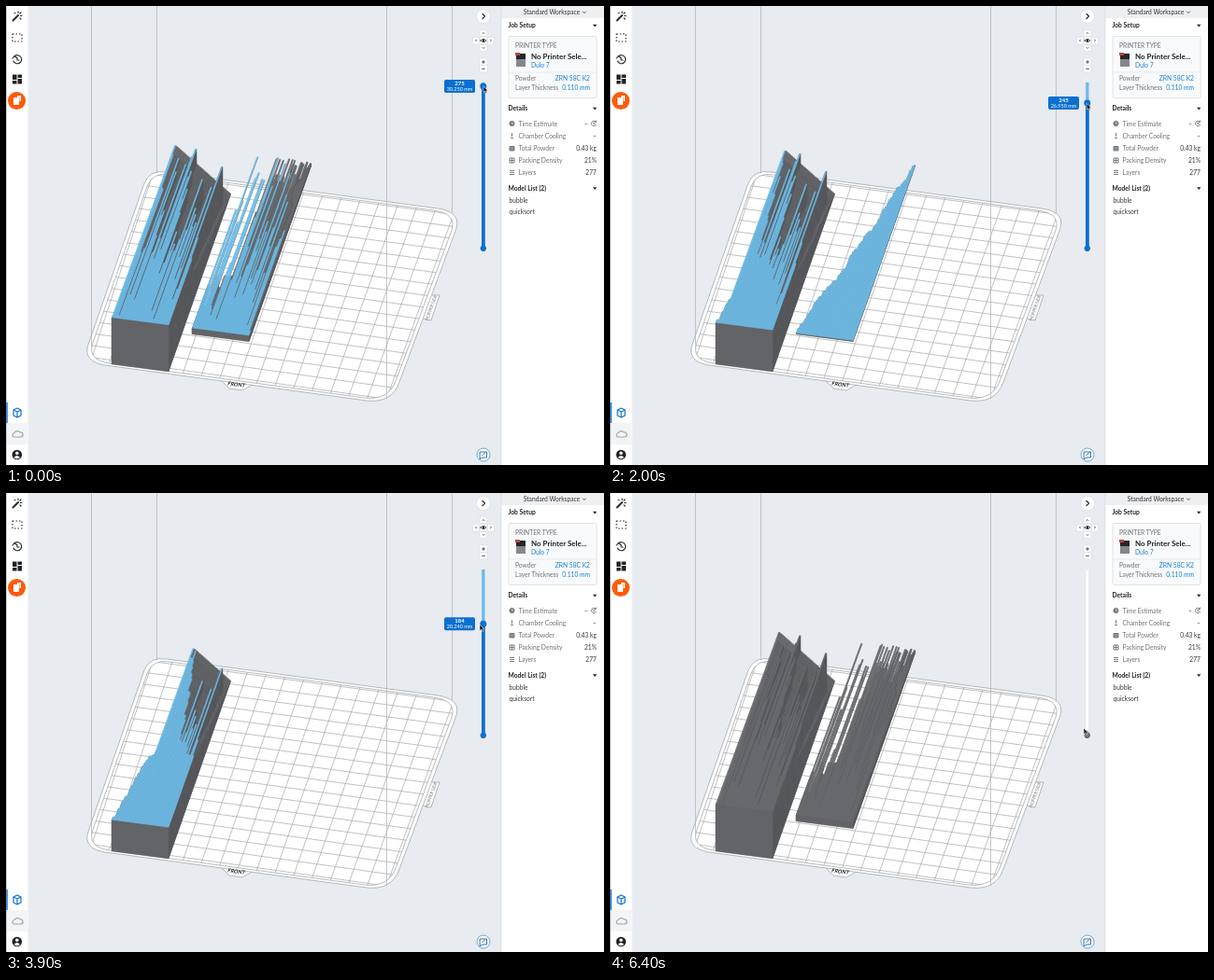
Recreate the animation shown at these times as an HTML page with a canvas. Size 640 by 492 pixels, loop 7.14 s.

```html
<!DOCTYPE html>
<html lang="en">
<head>
<meta charset="utf-8">
<title>Layer preview</title>
<style>
  html, body { margin: 0; width: 100%; height: 100%; overflow: hidden; background: #e8ebef; }
  svg, canvas { position: absolute; left: 0; top: 0; width: 640px; height: 492px; }
  text { font-family: Lato, "Open Sans", sans-serif; font-size: 6.7px; fill: #33373b; }
  .bold { font-weight: 700; fill: #202428; }
  .soft { fill: #6d7278; }
  .link { fill: #1581d0; }
  .end { text-anchor: end; }
  .mid { text-anchor: middle; }
  .icon { fill: none; stroke: #2b2e31; stroke-width: 1.2; stroke-linecap: round; stroke-linejoin: round; }
  .button { fill: #fff; stroke: #cfd4d9; stroke-width: .5; }
</style>
</head>
<body>
<svg viewBox="0 0 640 492">
  <defs>
    <path id="plate" d="M148 190Q154 175 172 178L462 217Q489 221 481 241L421 403Q413 426 386 423L106 385Q82 381 88 363Z"/>
    <clipPath id="bed"><use href="#plate" transform="translate(285 300) scale(.976) translate(-285 -300)"/></clipPath>
  </defs>
  <rect width="640" height="492" fill="#e8ebef"/>
  <g fill="#fff" stroke="#a4a7aa" stroke-width=".8">
    <path d="M229 400L239 410L253 412L265 405M455 310L464 310L455 337L446 335"/>
    <use href="#plate"/>
    <use href="#plate" transform="translate(285 300) scale(.976) translate(-285 -300)"/>
    <path id="grid" clip-path="url(#bed)" fill="none" stroke="#a5a7aa" stroke-width=".7"/>
    <path d="M91.5 0V366M161.5 0V179M407.5 0V421M477.500 0V222" fill="none" stroke="#aeb2b6" stroke-width=".7"/>
  </g>
  <text class="mid bold" style="font-size:5.5px" transform="translate(246 407.500) rotate(7) skewX(-12)">FRONT</text>
  <text class="mid soft" style="font-size:4.500px" transform="translate(456.500 324) rotate(-70)">HOPPER SIDE</text>
</svg>
<canvas id="models" width="640" height="492"></canvas>
<svg viewBox="0 0 640 492">
  <!-- tool strip -->
  <path d="M0 0H23.500V492H0Z" fill="#fff"/>
  <path d="M.5 0V492" stroke="#b9bdc1" stroke-width=".8"/>
  <path d="M1 447H23V470H1Z" fill="#f3f4f5"/>
  <path d="M1 425V447" stroke="#0d72cf" stroke-width="1.5"/>
  <g class="icon">
    <path d="M7.500 15.500L13 10" stroke-width="2"/>
    <path d="M13 6V7.500M17 10.500H15.500M16 7L15 8M9 7.500H10M16 14L15 13"/>
    <rect x="7" y="30" width="10" height="8" stroke-dasharray="1.5 2" stroke-linecap="butt"/>
    <path d="M9 54A4.500 4.500 0 1 1 8 59M7 56L9 53.500L11.500 55.500M12 55.500V58H14"/>
  </g>
  <path d="M7 73.500H11.500V79H7ZM12.500 73.500H17V77H12.500ZM7 80H11.500V83.500H7ZM12.500 78H17V83.500H12.500Z" fill="#222527"/>
  <circle cx="11.500" cy="101.500" r="9.500" fill="#ff5a0a"/>
  <path d="M8 98H14V106H8ZM12 96H16V102H14.500V98H12Z" fill="#fff"/>
  <g class="icon" stroke-width="1">
    <path d="M8 433L12 431L16 433V439L12 441L8 439ZM8 433L12 435L16 433M12 435V441" stroke="#0d72cf" style="stroke:#0d72cf"/>
    <path d="M8 462A2.500 2.500 0 0 1 9 457.500A3.500 3.500 0 0 1 15 457A2.500 2.500 0 0 1 16 462Z" style="stroke:#a2a6aa"/>
  </g>
  <circle cx="11.800" cy="481" r="5.300" fill="#202326"/>
  <circle cx="11.800" cy="479.300" r="1.800" fill="#fff"/>
  <path d="M8.500 484Q11.800 480 15 484Q11.800 486.500 8.500 484Z" fill="#fff"/>

  <!-- view controls -->
  <circle class="button" cx="511" cy="11" r="7.500"/>
  <path class="icon" d="M510 8.500L512.500 11L510 13.500"/>
  <g class="button">
    <rect x="507" y="25.500" width="8" height="7" rx="1.5"/><rect x="507" y="41.500" width="8" height="7" rx="1.5"/>
    <rect x="499.500" y="33.500" width="7" height="7.500" rx="1.5"/><rect x="515.500" y="33.500" width="7" height="7.500" rx="1.5"/>
    <rect x="507" y="33" width="8" height="8" rx="1.5"/>
    <rect x="507" y="56" width="8" height="7.500" rx="1"/><rect x="507" y="63.500" width="8" height="7.500" rx="1"/>
  </g>
  <g class="icon" style="stroke-width:.8">
    <path d="M510 29.500L511 28.500L512 29.500M510 44.500L511 45.500L512 44.500M503.500 36L502.500 37L503.500 38M518.500 36L519.500 37L518.500 38M509.500 60H512.500M511 58.500V61.500M509.500 67.300H512.500"/>
    <path d="M508 37Q511 33.500 514 37Q511 40.500 508 37Z"/>
  </g>
  <circle cx="511" cy="37" r="1.300" fill="#222"/>
  <circle cx="511" cy="481" r="7" fill="#fff" stroke="#4a94ce" stroke-width=".8"/>
  <path d="M507.500 478H514.500V484H510L507.500 485.500ZM509.500 482L513 478.500" class="icon" style="stroke:#23639a;stroke-width:.9"/>

  <!-- side panel -->
  <rect x="530" width="110" height="492" fill="#fff"/>
  <rect x="530" width="110" height="13" fill="#eeeff0"/>
  <path d="M530 0V492" stroke="#d5d9dd" stroke-width=".7"/>
  <text class="mid" x="584" y="9">Standard Workspace</text>
  <path class="icon" d="M617.500 6L619 7.500L620.500 6" style="stroke-width:.8"/>
  <rect x="538" y="32.500" width="94" height="66" rx="1.5" fill="#f9fafb" stroke="#d9dde1" stroke-width=".8"/>
  <text class="soft" x="545" y="45">PRINTER TYPE</text>
  <path d="M546 52H556V65H546Z" fill="#85888b"/><path d="M546 51H556V57H546Z" fill="#242629"/><path d="M545 50H550V53H545Z" fill="#b9483e"/>
  <text class="bold" x="562" y="57" style="font-size:8px">No Printer Sele...</text>
  <text class="link" x="562" y="65.500">Dulo 7</text>
  <path d="M538 71H632" stroke="#e0e3e6" stroke-width=".7"/>
  <g id="panel"></g>
  <g fill="none" stroke="#777c81" stroke-width="1">
    <circle cx="541.500" cy="126" r="2.600" fill="#777c81"/><path d="M541.500 124.500V126H543" stroke="#fff" stroke-width=".6"/>
    <path d="M541.500 136V140M540 141.500H543"/><path d="M539 150.500H544V155H539Z" fill="#8b8f93"/>
    <path d="M539 163H544V168H539ZM541.500 163V168M539 165.500H544"/><path d="M539 176.500H544M539 178.500H544M539 180.500H544"/>
    <path d="M631 124A2.700 2.700 0 1 0 631.700 127M629 124.500V126.500H630.500M631.500 122.500V124.500H629.700" stroke="#4d5155" stroke-width=".7"/>
  </g>

  <!-- layer slider -->
  <rect x="509" y="82" width="3.500" height="178" rx="1.5" fill="#fff" stroke="#d4d8dc" stroke-width=".4"/>
  <g id="slider">
    <rect x="509.200" y="82" width="3.300" height="178" fill="#6cb9ea"/>
    <rect id="range" x="509" width="3.700" fill="#0b70cf"/>
    <circle id="knob" cx="510.800" r="3.500" fill="#0b70cf"/>
    <rect id="tag" height="14" rx="1.800" fill="#0b70cf"/>
    <text id="layer" class="mid" style="fill:#fff;font-weight:700;font-size:6px"></text>
    <text id="height" class="mid" style="fill:#fff;font-size:5.500px"></text>
  </g>
  <path id="foot" d="M510.800 254.500L513.500 258A3.200 3.200 0 1 1 508.100 258Z"/>
  <path id="cursor" d="M0 0V6.500L1.600 5.200L2.700 7.600L3.800 7.100L2.800 4.800H4.800Z" fill="#111" stroke="#fff" stroke-width=".5"/>
</svg>
<script>
const $ = id => document.getElementById(id);
const mix = (a, b, f) => a + (b - a) * f;
const LOOP = 7140, TICK = 100, LAST = 64, TOP = 277, BARS = 50;
const BLUE = '#6cbae5', FRONT = '#626467', SIDE = '#505255', LID = '#686a6d';

// [time, layer] and [time, cursor x, cursor y]
const layerKeys = [[0, 275], [1300, 259], [2700, 231], [3200, 220], [3900, 184], [4000, 179], [4800, 116], [4900, 106], [5700, 35], [6300, 2]];
const cursorKeys = [[0, 511, 86], [1300, 511, 96], [2700, 509.5, 113], [3900, 507, 141], [4900, 503.5, 188], [5700, 505, 230], [6400, 507, 252]];

function sample(keys, time, column) {
  const next = keys.findIndex(key => key[0] > time);
  if (next < 0) return keys[keys.length - 1][column];
  const a = keys[next - 1], b = keys[next];
  return mix(a[column], b[column], (time - a[0]) / (b[0] - a[0]));
}

function randomBars(seed, fixed) {
  const bars = Array.from({ length: BARS }, () => {
    seed = (seed * 16807) % 2147483647;
    return 0.02 + 0.94 * seed / 2147483647;
  });
  return Object.assign(bars, fixed);
}

// One snapshot per outer pass of an exchange sort.
function exchangeSort(bars) {
  const states = [bars.slice()];
  for (let i = 0; i < BARS - 1; i++) {
    for (let j = i + 1; j < BARS; j++)
      if (bars[j] < bars[i]) [bars[i], bars[j]] = [bars[j], bars[i]];
    states.push(bars.slice());
  }
  return states;
}

// One snapshot per partition level.
function quickSort(bars) {
  const states = [bars];
  let groups = [bars];
  while (groups.some(group => group.length > 1)) {
    groups = groups.flatMap(group => {
      if (group.length < 2) return [group];
      const pivot = group[group.length >> 1];
      return [group.filter(v => v < pivot), [pivot], group.filter(v => v > pivot)].filter(g => g.length);
    });
    states.push(groups.flat());
  }
  return states;
}

const models = [
  { x: 113, base: 0, states: exchangeSort(randomBars(7321, { 0: 1, 19: 0.99, 44: 0.785, 49: 0.38 })) },
  { x: 199, base: 240, states: quickSort(randomBars(90417, { 2: 0.995, 20: 1, 28: 0.97 })) }
];

const ctx = $('models').getContext('2d');

function project(model, u, depth, z) {
  const lift = z / TOP, x = model.x + 61 * u;
  return [x + depth * (67.5 - u), 384 + (x - 113) * 0.13 - 50 * lift - depth * (185 + 3 * u + 2 * (1 - lift))];
}

function quad(color, ...points) {
  ctx.fillStyle = ctx.strokeStyle = color;
  ctx.beginPath();
  points.forEach(p => ctx.lineTo(...p));
  ctx.closePath();
  ctx.fill();
  ctx.stroke();
}

function drawModel(model, cut, sliced) {
  if (cut <= model.base) return;
  const { states, base } = model, thick = (TOP - base) / states.length;
  const at = (u, depth, z) => project(model, u, depth, z);
  for (let s = states.length - 1; s >= 0; s--) {
    const low = TOP - (s + 1) * thick, full = low + thick;
    if (low >= cut) break;
    const high = Math.min(full, cut);
    const lid = sliced && full >= cut ? BLUE : LID;
    states[s].forEach((len, i) => {
      const a = i / BARS, b = (i + 1) / BARS, near = states[s][i + 1] || 0;
      if (near < len) quad(SIDE, at(b, near, low), at(b, len, low), at(b, len, high), at(b, near, high));
      quad(lid, at(a, 0, high), at(b, 0, high), at(b, len, high), at(a, len, high));
    });
  }
  quad(FRONT, at(0, 0, base), at(1, 0, base), at(1, 0, cut), at(0, 0, cut));
}

function drawSlider(layer) {
  const y = 86 + (275 - layer) * 0.597, mm = (layer * 0.11).toFixed(3) + ' mm';
  const width = 33 - (9 - mm.length) * 4;
  const set = (id, values) => Object.entries(values).forEach(([k, v]) => $(id).setAttribute(k, v));
  set('range', { y, height: 260 - y });
  set('knob', { cy: y });
  set('tag', { x: 502 - width, y: y - 7, width });
  set('layer', { x: 502 - width / 2, y: y - 1.2 });
  set('height', { x: 502 - width / 2, y: y + 4.8 });
  $('layer').textContent = layer;
  $('height').textContent = mm;
}

function buildGrid() {
  const point = (u, v) => [mix(mix(153, 485, u), mix(86, 411, u), v), mix(mix(177, 221, u), mix(379, 425, u), v)];
  let d = '';
  for (let i = -8; i <= 8; i++) {
    const f = 0.5 + i / 16.5;
    d += `M${point(f, 0)}L${point(f, 1)}M${point(0, f)}L${point(1, f)}`;
  }
  $('grid').setAttribute('d', d);
}

function buildPanel() {
  const text = (x, y, cls, label) => `<text x="${x}" y="${y}" class="${cls}">${label}</text>`;
  let out = '';
  [['Job Setup', 23], ['Details', 112], ['Model List (2)', 197.5]].forEach(([label, y]) => {
    out += text(537.5, y, 'bold', label) + `<path d="M628 ${y - 3.2}h4.400l-2.200 2.600z" fill="#24282c"/>`;
  });
  [['Powder', 'ZRN 58C K2', 79.5], ['Layer Thickness', '0.110 mm', 90]].forEach(([label, value, y]) => {
    out += text(545, y, 'soft', label) + text(625, y, 'link end', value);
  });
  [['Time Estimate', '–'], ['Chamber Cooling', '–'], ['Total Powder', '0.43 kg'], ['Packing Density', '21%'], ['Layers', '277']].forEach(([label, value], i) => {
    const y = 128.5 + i * 13.1;
    out += text(548.5, y, 'soft', label) + text(i ? 632 : 623, y, 'end', value);
  });
  out += text(538.5, 210.5, '', 'bubble') + text(538.5, 222.5, '', 'quicksort');
  $('panel').innerHTML = out;
}

function render(tick) {
  const time = tick * TICK, sliced = tick < LAST;
  const layer = sliced ? Math.round(sample(layerKeys, time, 1)) : TOP;
  ctx.clearRect(0, 0, 640, 492);
  ctx.lineWidth = 0.35;
  models.forEach(model => drawModel(model, layer, sliced));
  $('slider').style.display = sliced ? '' : 'none';
  $('foot').setAttribute('fill', sliced ? '#0b70cf' : '#6a6e72');
  if (sliced) drawSlider(layer);
  $('cursor').setAttribute('transform', `translate(${sample(cursorKeys, time, 1)} ${sample(cursorKeys, time, 2)})`);
}

let shown = -1;
function loop() {
  const tick = Math.min(LAST, Math.floor(performance.now() % LOOP / TICK));
  if (tick !== shown) render(shown = tick);
  requestAnimationFrame(loop);
}

buildGrid();
buildPanel();
loop();
</script>
</body>
</html>
```
